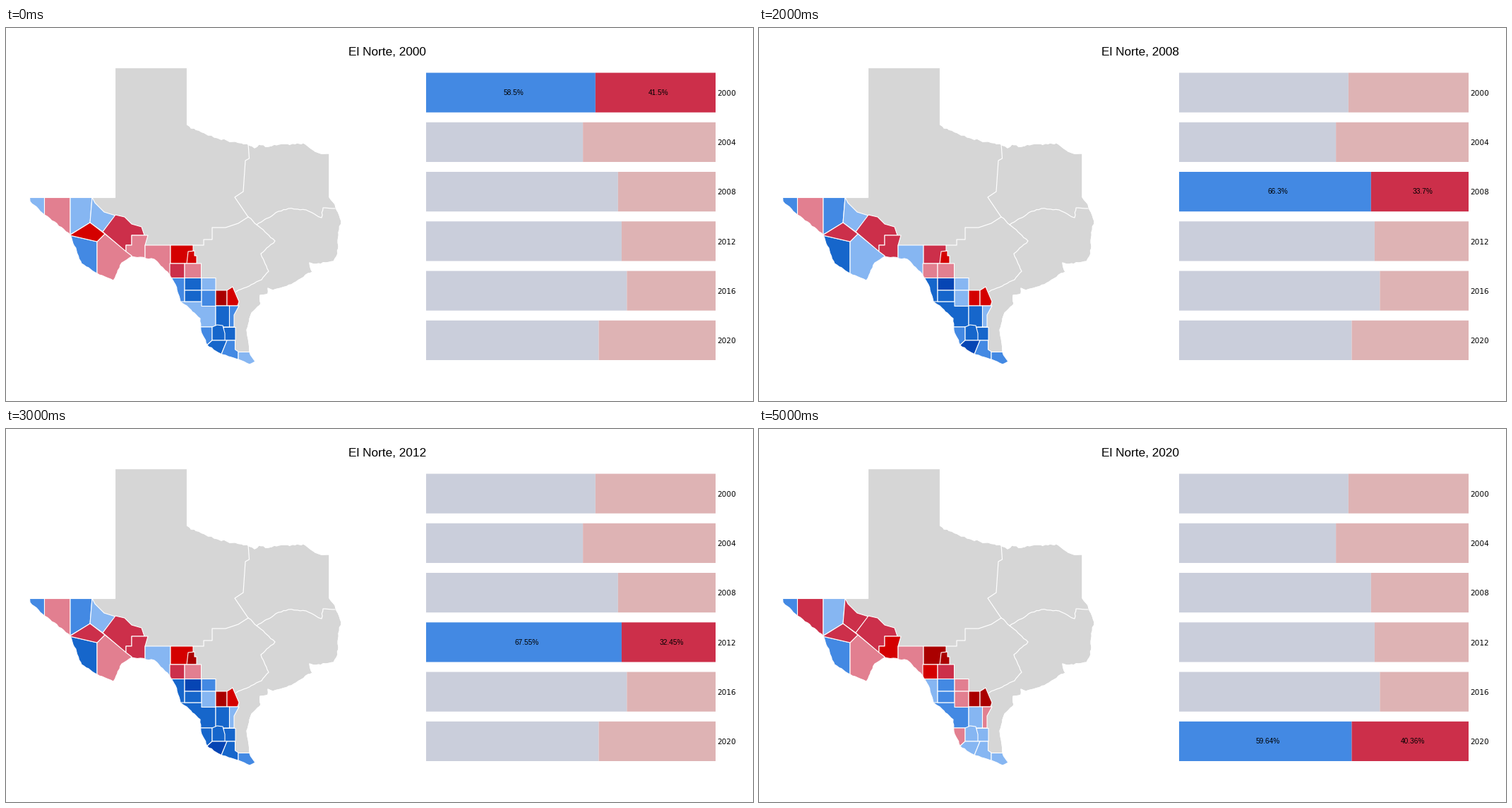
Animation of 1058 by 529 pixels, one loop 6000 ms. Source, as a matplotlib script:

```python
import numpy as np
import matplotlib.pyplot as plt
from matplotlib.animation import FuncAnimation
from matplotlib.patches import Polygon, Rectangle

WIDTH, HEIGHT, DPI = 1058, 529, 100
PT = 72 / DPI  # points per pixel

BLUE_SHARE = {2000: 58.5, 2004: 54.18, 2008: 66.3,
              2012: 67.55, 2016: 69.36, 2020: 59.64}
YEARS = list(BLUE_SHARE)

BLUE, RED = "#4389e3", "#cc2f4a"
PALE_BLUE, PALE_RED = "#cacedb", "#deb3b4"
GREY = "#d6d6d6"
# Light to dark; a county's sign picks the side, its size the shade.
BLUES = ["#86b6f2", BLUE, "#1666cb", "#0645b4"]
REDS = ["#e27f90", RED, "#d40000", "#aa0000", "#800000"]

BAR_LEFT, BAR_WIDTH = 595, 410
BAR_TOP, BAR_HEIGHT, BAR_STEP = 63.5, 56.2, 70.26

rng = np.random.default_rng(4)
fig = plt.figure(figsize=(WIDTH / DPI, HEIGHT / DPI), dpi=DPI, facecolor="white")
ax = fig.add_axes([0, 0, 1, 1])
ax.set_xlim(0, WIDTH)
ax.set_ylim(HEIGHT, 0)
ax.axis("off")


def label(x, y, text, size, font="Liberation Sans", ha="center"):
    return ax.text(x, y, text, fontsize=size * PT, family=font,
                   ha=ha, va="baseline", color="black")


def rough(*corners, jitter=1.3, step=4):
    """Sample a path evenly and shake the points between its corners."""
    path = []
    for start, end in zip(corners, corners[1:]):
        start, end = np.array(start), np.array(end)
        count = max(1, round(np.hypot(*(end - start)) / step))
        for i in range(count):
            shake = rng.uniform(-jitter, jitter, 2) if i else 0
            path.append(start + (end - start) * i / count + shake)
    return path + [np.array(corners[-1])]


def outlined(path, **style):
    return ax.add_patch(Polygon(path, edgecolor="white", linewidth=1.1 * PT,
                                joinstyle="round", snap=False, **style))


def border(path):
    ax.plot(*np.transpose(path), color="white", lw=1.2 * PT,
            solid_joinstyle="round", snap=False)


panhandle = [(33.5, 240.5), (154.5, 240.5), (154.5, 56.5), (256.5, 56.5)]
red_river = rough((256.5, 137), (262, 142), (283, 150), (300, 156), (321, 161),
                  (341, 164), (352, 170), (358, 165), (372, 168), (386, 165),
                  (421, 163), (432, 171), (446, 178), (458, 178))
east = rough((458, 240), (466, 250), (475, 274), (471, 290), (470, 320),
             (464, 331), (438, 335), (430, 333), (434, 346), (428, 348),
             (404, 364), (378, 372), (371, 369), (371, 377), (360, 379),
             (361, 391), (348, 404), (341, 428), (345, 460),
             (353, 473), (345, 477), jitter=0.8)
rio_grande = rough((345, 477), (329, 470), (304, 462), (285, 450), (276, 429),
                   (275, 412), (256, 394), (247, 388), (240, 364), (231, 349),
                   (210, 328), (178, 324), (164, 333), (152, 358), (129, 348),
                   (107, 334), (91, 294), (69, 275), (54.5, 265), (34, 246),
                   jitter=0.7)
outline = panhandle + red_river + east + rio_grande
state = outlined(outline, facecolor=GREY)

border([(343, 164), (344.5, 185), (339, 188), (336, 232), (324, 240), (343, 268)])
border(rough((343, 268), (355, 279), (386, 260), (400, 256), (425, 258),
             (447, 269), (449, 255), (466, 256), jitter=0.7))
border([(343, 268), (329, 277), (311, 283), (292, 283), (292, 300),
        (280, 300), (280, 308), (265, 308)])
border(rough((355, 279), (381, 302), (361, 320), (372, 345), (362, 357),
             (326, 374), jitter=0.7))

counties = []


def county(levels, *corners):
    """Counties may reach past the river; the state outline trims them."""
    patch = outlined(corners)
    patch.set_clip_path(state)
    counties.append((patch, levels))


def box(levels, left, top, right, bottom):
    county(levels, (left, top), (right, top), (right, bottom), (left, bottom))


# Far west
box((1, 1, 2, 2, 3, 2), 20, 230, 54.5, 300)
box((-1, -2, -1, -1, -2, -2), 54.5, 230, 91, 300)
county((1, -1, 2, 2, 2, 1), (91, 240), (122, 240), (119, 276), (91, 293))
county((1, -1, 1, 1, 1, -2), (122, 240), (126, 248), (139, 261), (155, 266),
       (137, 289), (119, 276))
county((2, 2, 3, 3, 2, 2), (90, 294), (129, 303), (129, 370), (80, 370))
county((-1, -1, 1, -1, -1, -1), (129, 303), (140, 292), (178, 323),
       (178, 370), (129, 370))
county((-3, -2, -2, -2, -2, -2), (119, 276), (140, 292), (129, 303), (90, 294))
county((-2, -3, -2, -2, -2, -2), (155, 265), (168, 268), (178, 278), (192, 282),
       (196, 294), (178, 294), (178, 308), (170, 308), (170, 317), (137, 289))
county((-1, -2, -2, -2, -2, -3), (178, 294), (201, 294), (197, 308), (197, 340),
       (178, 340), (178, 323), (170, 317), (170, 308), (178, 308))
box((-1, -1, 1, 1, 1, -1), 197, 308, 233, 360)

# Hill country edge
box((-3, -3, -2, -3, -3, -4), 233, 308, 265, 334)
county((-3, -4, -3, -4, -4, -4), (258, 317), (267, 316), (267, 323), (270, 323),
       (270, 334), (256, 334))
box((-2, -2, -1, -2, -2, -3), 232, 334, 253, 354.5)
box((-1, -2, -1, -1, -1, -2), 253, 334, 276.5, 354.5)

# Brush country
box((2, 1, 3, 3, 3, 1), 225, 354.5, 253, 389)
box((3, 3, 4, 4, 3, 2), 253, 354.5, 277, 372)
box((1, -1, 1, 2, 1, -1), 277, 354.5, 297, 372)
box((1, 1, 3, 3, 3, 2), 240, 388, 297, 424)
box((3, 2, 3, 3, 2, 2), 253, 372, 277, 388)
box((2, 1, 1, 1, 1, -1), 277, 372, 297, 394.5)
box((-4, -4, -3, -4, -5, -4), 297, 372, 313, 394)
county((-3, -3, -3, -3, -4, -4), (313, 372), (321, 367), (330, 388),
       (328, 394), (313, 394))

# Southern tip
box((3, 3, 3, 3, 2, 1), 297, 394, 316.5, 424)
county((2, 1, 1, 1, 1, -1), (316.5, 394), (330, 394), (323, 407),
       (323, 424), (316.5, 424))
county((2, 1, 2, 3, 2, -1), (265, 424), (292, 424), (292, 443), (280, 454))
box((3, 2, 3, 3, 3, 1), 308, 424.5, 325, 443)
county((3, 2, 3, 3, 3, 1), (292, 424), (299, 421), (307, 422), (310, 433),
       (310, 443), (292, 443))
county((3, 3, 4, 4, 4, 1), (292, 443), (313, 443), (302, 470), (280, 470),
       (280, 454))
county((2, 1, 2, 3, 3, 1), (313, 443), (324.5, 443), (324.5, 456), (329, 459),
       (329, 485), (296, 485))
box((1, -1, 2, 2, 2, 1), 329, 459.5, 360, 485)

outlined(outline, fill=False)

bars = []
for row, (year, share) in enumerate(BLUE_SHARE.items()):
    top = BAR_TOP + row * BAR_STEP
    split = BAR_LEFT + BAR_WIDTH * share / 100
    ends = [BAR_LEFT, split, BAR_LEFT + BAR_WIDTH]
    label(1007.4, top + 32.3, str(year), 10.5, "DejaVu Sans", "left")
    for left, right, value, colors in zip(ends, ends[1:], (share, 100 - share),
                                          ((BLUE, PALE_BLUE), (RED, PALE_RED))):
        bar = ax.add_patch(Rectangle((left, top), right - left, BAR_HEIGHT,
                                     lw=0, snap=False))
        text = label((left + right) / 2 + 3.8, top + 31.3, f"{value:.4g}%", 10.1)
        bars.append((row, bar, text, colors))

title = label(540, 39, "", 17.3)


def shade(level):
    return BLUES[level - 1] if level > 0 else REDS[-level - 1]


def update(step):
    title.set_text(f"El Norte, {YEARS[step]}")
    for patch, levels in counties:
        patch.set_facecolor(shade(levels[step]))
    for row, bar, text, (bright, pale) in bars:
        bar.set_facecolor(bright if row == step else pale)
        text.set_visible(row == step)


anim = FuncAnimation(fig, update, frames=len(YEARS), interval=1000,
                     init_func=lambda: update(0), repeat=True)
plt.show()
```
